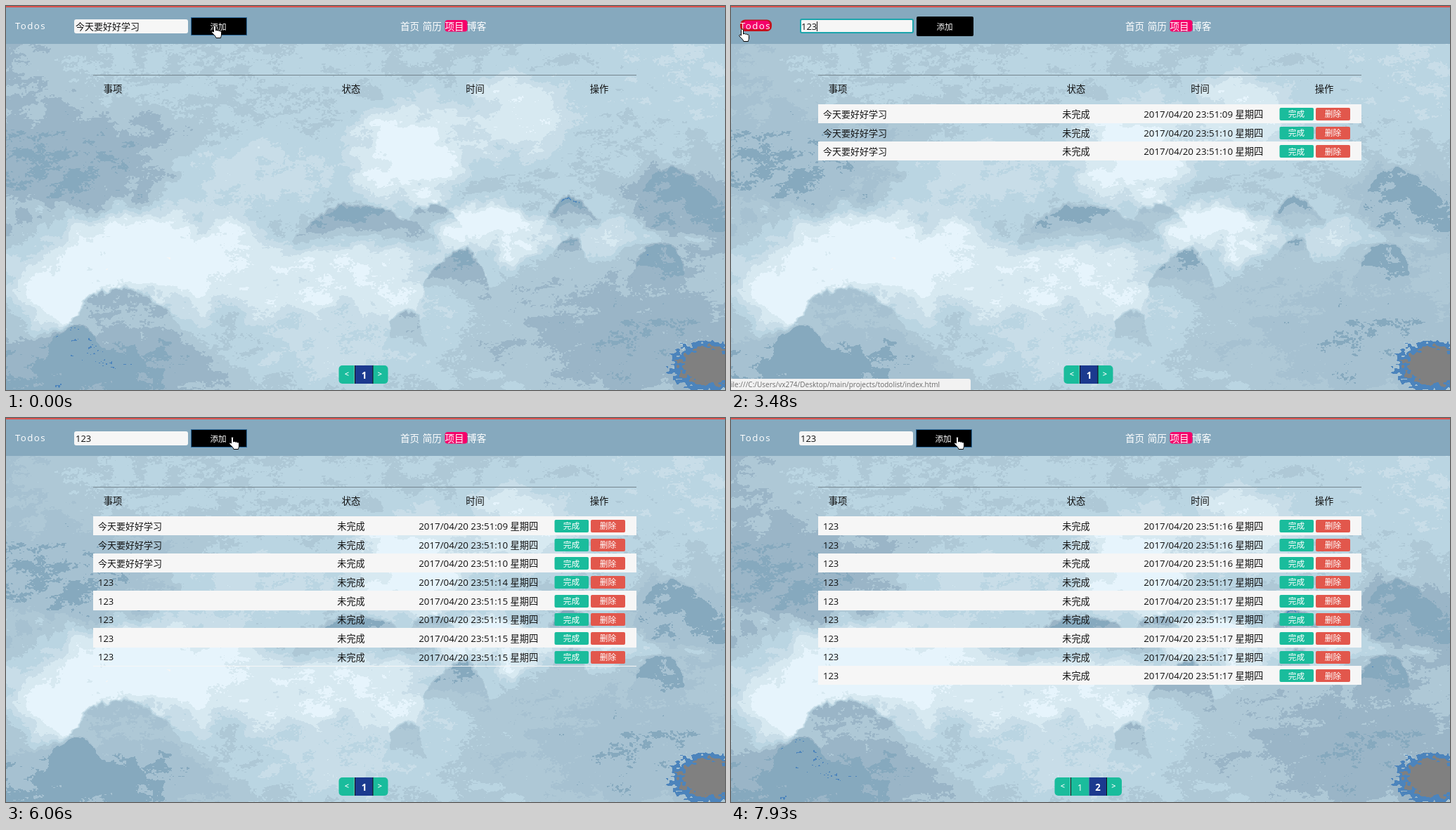
An HTML page with a canvas for the animation above (8000 ms loop, 1023 by 547 pixels).

```html
<!DOCTYPE html>
<html lang="zh-CN">
<head>
<meta charset="utf-8">
<title>Todos</title>
<style>
html, body { margin: 0; width: 100%; height: 100%; overflow: hidden; background: #afc9d8; }
canvas { display: block; }
</style>
</head>
<body>
<canvas id="stage" width="1023" height="547"></canvas>
<script>
const W = 1023, H = 547, LOOP = 8000;
const ctx = document.getElementById('stage').getContext('2d');
const FONT = '"Open Sans", "Noto Sans CJK SC", "Noto Sans CJK", sans-serif';
const GREEN = '#1abc9c', RED = '#e2574c', PINK = '#f5006a', PAPER = '#f6f6f6', NAVY = '#1b3a8f', INK = '#111';
const clamp = (v, a = 0, b = 1) => Math.min(b, Math.max(a, v));
const smooth = v => { v = clamp(v); return v * v * (3 - 2 * v); };

// ---- misty landscape ----
const lattice = new Float32Array(65536);
let seed = 20170420;
for (let i = 0; i < lattice.length; i++) {
  seed = (Math.imul(seed, 1664525) + 1013904223) >>> 0;
  lattice[i] = seed / 4294967296;
}
function noise(x, y) {
  const xi = Math.floor(x), yi = Math.floor(y);
  let fx = x - xi, fy = y - yi;
  fx *= fx * (3 - 2 * fx);
  fy *= fy * (3 - 2 * fy);
  const r0 = (yi & 255) << 8, r1 = ((yi + 1) & 255) << 8, c0 = xi & 255, c1 = (xi + 1) & 255;
  const a = lattice[r0 + c0], b = lattice[r1 + c0];
  const top = a + (lattice[r0 + c1] - a) * fx, low = b + (lattice[r1 + c1] - b) * fx;
  return top + (low - top) * fy;
}
// Layered noise around zero
function cloud(x, y) {
  let sum = -.5, gain = .53;
  for (let k = 1; k < 16; k *= 2, gain /= 2) sum += gain * noise(x * k + k * 31, y * k + k * 17);
  return sum;
}
// Soft washes: x, y, radius x, radius y, tone
const WASHES = [
  [100, 225, 230, 75, .14], [960, 90, 160, 80, .55], [350, 240, 140, 60, .62],
  [570, 205, 90, 90, .98], [730, 160, 110, 65, .8], [990, 290, 130, 80, .15],
  [690, 322, 105, 42, 1], [200, 360, 200, 80, 1.02], [80, 405, 100, 65, .95],
  [480, 400, 190, 70, .86], [910, 470, 250, 120, .2], [480, 490, 140, 60, .62],
  [140, 525, 220, 60, .1], [860, 328, 130, 24, .65]
];
// Domes with a crisp crest that sink into mist: x, crest y, half width, depth, tone
const RIDGES = [
  [505, 286, 115, 70, .08], [605, 272, 45, 55, .12], [955, 225, 75, 120, .08],
  [803, 274, 44, 44, -.06], [640, 342, 55, 110, .08], [803, 318, 30, 65, .15],
  [928, 332, 48, 95, .05], [165, 402, 110, 110, .2], [100, 452, 70, 130, .04], [565, 425, 35, 90, .25]
];
const rgb = h => [1, 3, 5].map(i => parseInt(h.substr(i, 2), 16));
const TONES = ['#86a9be', '#9ab5c7', '#aec8d6', '#bad5e2', '#c8dde8', '#d7e9f1', '#e6f4fc'].map(rgb);
const [WHITE, BLUE, GRAY, SOFT] = ['#f5f5f5', '#4c84bc', '#808080', '#a6c1d1'].map(rgb);

function toneAt(x, y) {
  const n = cloud(x / 45, y / 36), m = cloud(x / 40 + 90, y / 40 + 50);
  const wx = x + n * 95, wy = y + m * 80;
  let v = .44 - .16 * smooth(1 - x / 180);
  for (const [cx, cy, rx, ry, tone] of WASHES) {
    const dx = (wx - cx) / rx, dy = (wy - cy) / ry, d = dx * dx + dy * dy;
    if (d < 1.7) v += (tone - v) * smooth((1.3 - Math.sqrt(d)) / 1.05);
  }
  const bumps = noise(x / 13, 7) * 9 + noise(x / 4, y / 4) * 5;
  for (const [cx, cy, rx, depth, tone] of RIDGES) {
    const u = (x + n * 25 - cx) / rx, dy = y + m * 25 - cy;
    if (u < -1 || u > 1 || dy > depth) continue;
    const d = dy - u * u * depth * .75 - bumps + 7;
    if (d > 0) v += (tone - v) * clamp(d / 6) * (1 - smooth(dy / depth));
  }
  const streak = noise((x + y * 5) / 90, (y + x * .17) / 3) - .5;
  return v + cloud(x / 24, y / 15) * .26 + (noise(x / 2.5, y / 2) - .5) * .07 + streak * .04;
}
function colorAt(v, corner, rich) {
  if (corner < 1) return GRAY;
  if (corner < 1.35 || v < (rich ? -.01 : -.07)) return BLUE;
  if (v > 1.1) return WHITE;
  const k = clamp(Math.floor(v * 7), 0, 6);
  return k === 1 && !rich ? SOFT : TONES[k];
}
function paintLandscapes() {
  const images = [new ImageData(W, H), new ImageData(W, H)];
  for (let y = 54; y < H; y++) for (let x = 0; x < W; x++) {
    const v = toneAt(x, y), i = (y * W + x) * 4;
    const corner = Math.hypot((x - 998) / 40, (y - 513) / 27) + (noise(x / 5, y / 3) - .5) * .5;
    images.forEach((img, n) => img.data.set([...colorAt(v, corner, n === 0), 255], i));
  }
  return images.map(img => {
    const c = document.createElement('canvas');
    c.width = W; c.height = H;
    c.getContext('2d').putImageData(img, 0, 0);
    return c;
  });
}
const [richView, plainView] = paintLandscapes();

// ---- drawing helpers ----
function rect(x, y, w, h, fill, radius = 0) {
  ctx.fillStyle = fill;
  ctx.beginPath();
  ctx.roundRect(x, y, w, h, radius);
  ctx.fill();
}
function text(s, x, y, size, fill = INK, align = 'left', weight = 400) {
  ctx.font = `${weight} ${size}px ${FONT}`;
  ctx.fillStyle = fill;
  ctx.textAlign = align;
  ctx.fillText(s, x, y + size * .38);
}

// ---- timeline ----
const TASK = '今天要好好学习', PAGE = 10;
const FOCUS = 1310, CLEAR = 2340, BLUR = 4560;
const every = (from, step, count) => Array.from({ length: count }, (_, i) => from + i * step);
const TYPED = every(3140, 170, 3);
const ADDED = [40, ...every(420, 140, 2), 4650, ...every(5450, 186, 6), ...every(6560, 171, 9)];
// start, end, target x, target y
const MOVES = [[700, 1020, 233, 30], [FOCUS, 1630, 16, 33], [4030, 4360, 322, 27]];

function pointer(t) {
  let x = 297, y = 28;
  for (const [from, to, tx, ty] of MOVES) {
    const k = smooth((t - from) / (to - from));
    x += (tx - x) * k;
    y += (ty - y) * k;
  }
  return [x, y];
}

const HAND = new Path2D('M1 1.5c0-2 3-2 3 0V7c.5-1 2.5-1 3 .3 .8-.8 2.4-.5 2.6 .7 1-.6 2.4-.2 2.4 1.2V13' +
  'c0 2-1 2.5-1 4.5H4.5C4 15 1 13-1.5 10c-1-1.5 .5-2.7 2.5-1z');
function drawPointer(t) {
  const [x, y] = pointer(t);
  if ((x > 97 && x < 259) || (t >= FOCUS && t < 1580)) {
    rect(x, y - 5, 1, 11, '#222');
    rect(x - 2, y - 6, 5, 1, '#222');
    rect(x - 2, y + 6, 5, 1, '#222');
    return;
  }
  ctx.save();
  ctx.translate(x - 2.5, y);
  ctx.fillStyle = '#fff';
  ctx.strokeStyle = '#000';
  ctx.lineWidth = 1;
  ctx.fill(HAND);
  ctx.stroke(HAND);
  ctx.restore();
}

function drawInput(t) {
  const focus = t >= FOCUS && t < BLUR, x = focus ? 100 : 99;
  if (focus) {
    rect(98, 18, 162, 21, '#1ca5ac', 3);
    rect(100, 20, 158, 17, PAPER, 1);
  } else rect(97, 19, 162, 20, PAPER, 3);

  const keys = TYPED.filter(at => t >= at);
  const value = t < CLEAR ? TASK : '123'.slice(0, keys.length);
  if (value) text(value, x, 29, 13);
  else text('新建一个Todo', x, 28, 13, '#777');
  const width = ctx.measureText(value).width;

  if (t > FOCUS + 40 && t < CLEAR) {
    const from = clamp(pointer(t)[0], x, x + width);
    ctx.save();
    ctx.beginPath();
    ctx.rect(from, 20, x + width - from, 17);
    ctx.clip();
    rect(x, 20, width, 17, '#3390ff');
    text(value, x, 29, 13, '#fff');
    ctx.restore();
  } else if (focus) {
    const edit = Math.max(t < CLEAR ? FOCUS : CLEAR, ...keys);
    if (Math.floor((t - edit) / 510) % 2 === 0) rect(Math.round(x + width), 22, 1, 14, INK);
  }
}

function drawHeader(t) {
  rect(0, 0, W, 54, '#86a9be');
  rect(0, 0, W, 2, '#d9534f');
  ctx.globalAlpha = smooth((t - 1580) / 150) * (1 - smooth((t - 4050) / 200));
  rect(13, 19.5, 45, 16.5, '#c4121f', 7);
  rect(17, 21, 38, 12, PINK, 5);
  ctx.globalAlpha = 1;
  ctx.letterSpacing = '1.4px';
  text('Todos', 13, 28, 13.3, '#fff', 'left', 500);
  ctx.letterSpacing = '0px';

  drawInput(t);
  const idle = t >= FOCUS && t < BLUR;
  if (idle) rect(264, 15, 81, 28, '#000', 2);
  else {
    rect(263, 16, 80, 26, '#2c6a9c');
    rect(264, 17, 78, 24, '#000');
  }
  text('添加', idle ? 304 : 302, 30, 11.6, '#fff', 'center', 500);
  rect(624.5, 20, 32, 16.5, PINK, 4);
  ['首页', '简历', '项目', '博客'].forEach((s, i) => text(s, 561 + i * 31.7, 28.5, 13.6, '#fff'));
}

function drawTable(rows, first) {
  rect(124, 98, 773, 1, '#75868f');
  text('事项', 152, 118, 13.3, INK, 'center');
  ['状态', '时间', '操作'].forEach((s, i) => text(s, 491 + i * 176.5, 118, 13.3, INK, 'center'));
  rows.forEach((at, i) => {
    const y = 154 + i * 26.65, top = Math.round(y - 13.6), bottom = Math.round(y + 13.05);
    if (i % 2 === 0) rect(124, top, 773, bottom - top, PAPER);
    else rect(124, bottom - 1, 773, 1, PAPER);
    text(first + i < 3 ? TASK : '123', 131, y, 13);
    text('未完成', 491, y, 13.2, INK, 'center');
    const sec = String(10 + Math.floor((at - 70) / 1000)).padStart(2, '0');
    text(`2017/04/20 23:51:${sec} 星期四`, 672.3, y, 13.3, INK, 'center');
    const by = Math.round(y - 9);
    rect(780.5, by, 48.5, 18, GREEN, 2);
    rect(832, by, 49, 18, RED, 2);
    text('完成', 804.5, y, 11.7, '#fff', 'center');
    text('删除', 856.5, y, 11.7, '#fff', 'center');
  });
}

function drawPager(pages) {
  const x = 486.5 - pages * 13, end = x + 22.5 + pages * 25.5;
  rect(x, 512, 22, 26, GREEN, [5, 0, 0, 5]);
  for (let p = 1; p <= pages; p++) {
    const px = x + 23.5 + (p - 1) * 25.5, here = p === pages;
    rect(px, 512, 25.5, 26, here ? NAVY : GREEN);
    text(String(p), px + 12.5, 525.5, 13.3, '#fff', 'center', here ? 700 : 400);
  }
  rect(end + .5, 512, 21.5, 26, GREEN, [0, 5, 5, 0]);
  rect(x + 22.5, 512, 1, 26, INK);
  rect(end, 512, 1, 26, INK);
  text('<', x + 11.5, 524, 11, '#fff', 'center', 600);
  text('>', end + 10.5, 524, 11, '#fff', 'center', 600);
}

function drawStatus(t) {
  ctx.globalAlpha = smooth((t - 1590) / 40) * (1 - clamp((t - 4230) / 340));
  rect(-4, 531, 345, 20, '#f2f2f2', 3);
  text('ile:///C:/Users/vx274/Desktop/main/projects/todolist/index.html', 0, 539.5, 10, '#6b6b6b');
  ctx.globalAlpha = 1;
}

function render(t) {
  const all = ADDED.filter(at => t >= at);
  const pages = all.length > PAGE ? 2 : 1, first = (pages - 1) * PAGE;
  ctx.drawImage(t < ADDED[0] || pages === 2 ? richView : plainView, 0, 0);
  drawHeader(t);
  drawTable(all.slice(first), first);
  drawPager(pages);
  drawStatus(t);
  drawPointer(t);
}

const start = performance.now();
function tick() {
  render((performance.now() - start) % LOOP);
  requestAnimationFrame(tick);
}
tick();
</script>
</body>
</html>
```
